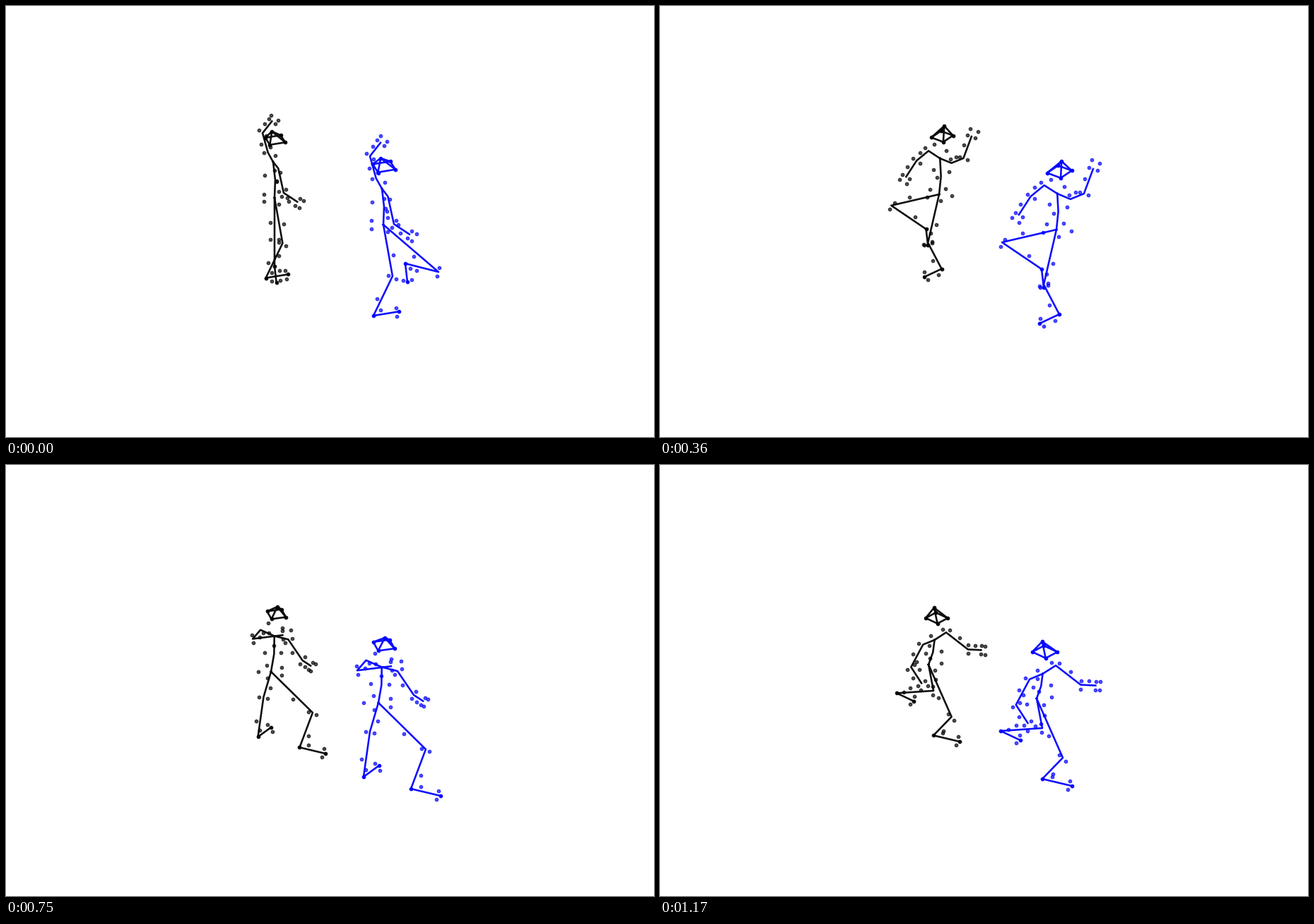
A matplotlib script that plays this animation: 917 px wide and 611 px high, repeating every 1.2 s.

```python
import numpy as np
import matplotlib.pyplot as plt
from matplotlib.animation import FuncAnimation

W, H, DPI = 917, 611, 64
PX = 72 / DPI                      # points per pixel
FRAMES, STEP = 40, 30

# Points are complex numbers: x to the right, y down, in pixels.
BEATS = np.array([0, 150, 360, 600, 750, 960, 1170])
THIGH_R = [78+67j, -41+83j, -77+18j, 28+29j, 67+66j, 49+80j, 37+84j]
SHIN_R = [-47-12j, 43-14j, 56+38j, -2+51j, -21+56j, -28+44j, -29+30j]
THIGH_L = [13+73j, 3+86j, -18+78j, -19+50j, -12+41j, 6+48j, 8+42j]
SHIN_L = [-27+56j, -32+39j, 22+42j, 27+64j, -9+64j, -65+4j, -59+4j]
FOREARM_L = [15-19j, -26-30j, 13-35j, -36+22j, 48-6j, 26+19j, 21+1j]
BLACK_PATH = [380+272j, 391+260j, 395+267j, 386+293j, 375+293j, 367+284j, 380+283j]
BLUE_PATH = [534+310j, 557+305j, 561+317j, 549+334j, 527+337j, 540+331j, 533+331j]


def spline(keys, t):
    """Smooth curve through one key point per beat."""
    keys = np.array(keys)
    slopes = np.gradient(keys, BEATS)
    k = min(np.searchsorted(BEATS, t, side="right") - 1, len(keys) - 2)
    span = BEATS[k + 1] - BEATS[k]
    u = (t - BEATS[k]) / span
    blend = u * u * (3 - 2 * u)
    return (keys[k] * (1 - blend) + keys[k + 1] * blend
            + span * u * (1 - u) * ((1 - u) * slopes[k] - u * slopes[k + 1]))


def ease(t, start, end):
    u = np.clip((t - start) / (end - start), 0, 1)
    return u * u * (3 - 2 * u)


def mix(a, b, u):
    return a + (b - a) * u


def axes(degrees):
    """Screen directions of the body's right side and front."""
    a = np.radians(degrees)
    return np.cos(a) + .5j * np.sin(a), np.sin(a) - .5j * np.cos(a)


def beads(p, q, singles, pairs, sign):
    """Markers beside the bone from p to q, alone or on both sides."""
    d = q - p
    normal = 1j * d / max(abs(d), 1)
    return ([p + u * d + 6 * sign * normal for u in singles]
            + [p + u * d + v * normal for u in pairs for v in (-6, 6)])


class Dancer:
    def __init__(self, ax, path, color, size, lift_at):
        self.path, self.size, self.lift_at = path, size, lift_at
        dot = dict(marker="o", ls="", color=color, ms=4.6 * PX, mew=1.1 * PX)
        self.dots, = ax.plot([], [], alpha=.7, **dot)
        self.nodes, = ax.plot([], [], alpha=.92, **dot)
        self.bones, = ax.plot([], [], color=color, lw=2.6 * PX, alpha=.94,
                              solid_joinstyle="round")

    def head(self, neck, turn):
        side, front = axes(turn)
        mid = neck + 3 - 31j
        ring = [mid + self.size * (12 * s * side + 13 * f * front)
                for s, f in ((-1, -1), (1, -1), (1, 1), (-1, 1))]
        return ring, mid - 13j - 5 * front

    def legs(self, t, pelvis, front):
        """Knee, ankle and toe of the right and the left leg."""
        lift = ease(t, self.lift_at, self.lift_at + 210)
        right = [mix(66j, spline(THIGH_R, t), lift),
                 mix(44j, spline(SHIN_R, t), lift),
                 mix(3 + 26j, 42 + 10j, ease(t, 360, 700))]
        left = [spline(THIGH_L, t), spline(SHIN_L, t), 38 * front]
        return [pelvis + self.size * np.cumsum(leg) for leg in (right, left)]

    def arms(self, t, neck, side, front):
        """Shoulder, elbow and wrist of the right and the left arm."""
        drop = mix(-18j, 30j, ease(t, 360, 600))
        right = [27 * side, 28 * side + 26j, 23 * front + 18j]
        left = [-27 * side,
                -28 * side + drop + 22 * front * ease(t, 600, 800),
                spline(FOREARM_L, t)]
        return [neck - 2j + self.size * np.cumsum(arm) for arm in (right, left)]

    def move(self, t):
        yaw = 72 + .43 * min(t, 980)
        glance = np.interp(t, [0, 150, 360, 750, 960], [0, 45, -10, -50, 0])
        side, front = axes(yaw)
        pelvis = spline(self.path, t)
        spine = -2 + .009 * t + 1j * mix(-51, -35, ease(t, 700, 1170))
        neck = pelvis + spine
        ring, crown = self.head(neck, yaw + glance)
        arms = self.arms(t, neck, side, front)
        legs = self.legs(t, pelvis, front)

        chains = [ring + [ring[0], crown, ring[2]], [ring[1], crown, ring[3]],
                  [neck, neck - spine / 2 + 2, pelvis]]
        chains += [[neck, *arm] for arm in arms]
        chains += [[pelvis, *leg] for leg in legs]
        path = np.concatenate([[*c, complex(np.nan, np.nan)] for c in chains])

        nodes = ring + [crown] + [p for leg in legs for p in leg[1:]]
        dots = self.trunk(neck, spine, side, front)
        for (shoulder, elbow, wrist), sign in zip(arms, (1, -1)):
            dots += beads(shoulder, elbow, (.04, .5), (), sign)
            dots += beads(elbow, wrist, (.55,), (0, 1, 1.3), sign)
        for (knee, ankle, toe), sign in zip(legs, (1, -1)):
            dots += beads(pelvis, knee, (.6,), (), sign)
            dots += beads(knee, ankle, (.62,), (.02,), -sign)
            dots += beads(ankle, toe, (.3,), (.9,), -1)

        for line, pts in ((self.bones, path), (self.nodes, nodes), (self.dots, dots)):
            line.set_data(np.real(pts), np.imag(pts))
        return self.dots, self.nodes, self.bones

    def trunk(self, neck, spine, side, front):
        """Markers in rings around the neck, chest and waist."""
        dots = []
        for level, count, radius in ((-.3, 2, 14), (.4, 3, 15), (1, 5, 21)):
            for a in 2 * np.pi * np.arange(count) / count:
                around = np.cos(a) * side + np.sin(a) * front
                dots.append(neck - level * spine + self.size * radius * around)
        return dots


fig = plt.figure(figsize=(W / DPI, H / DPI), dpi=DPI, facecolor="white")
ax = fig.add_axes([0, 0, 1, 1])
ax.set(xlim=(0, W), ylim=(H, 0))
ax.axis("off")

dancers = [Dancer(ax, BLACK_PATH, "black", .88, lift_at=150),
           Dancer(ax, BLUE_PATH, "blue", 1, lift_at=-210)]


def draw(i):
    return [part for d in dancers for part in d.move(i * STEP)]


anim = FuncAnimation(fig, draw, frames=FRAMES, interval=STEP,
                     repeat=True, repeat_delay=0)
plt.show()
```
